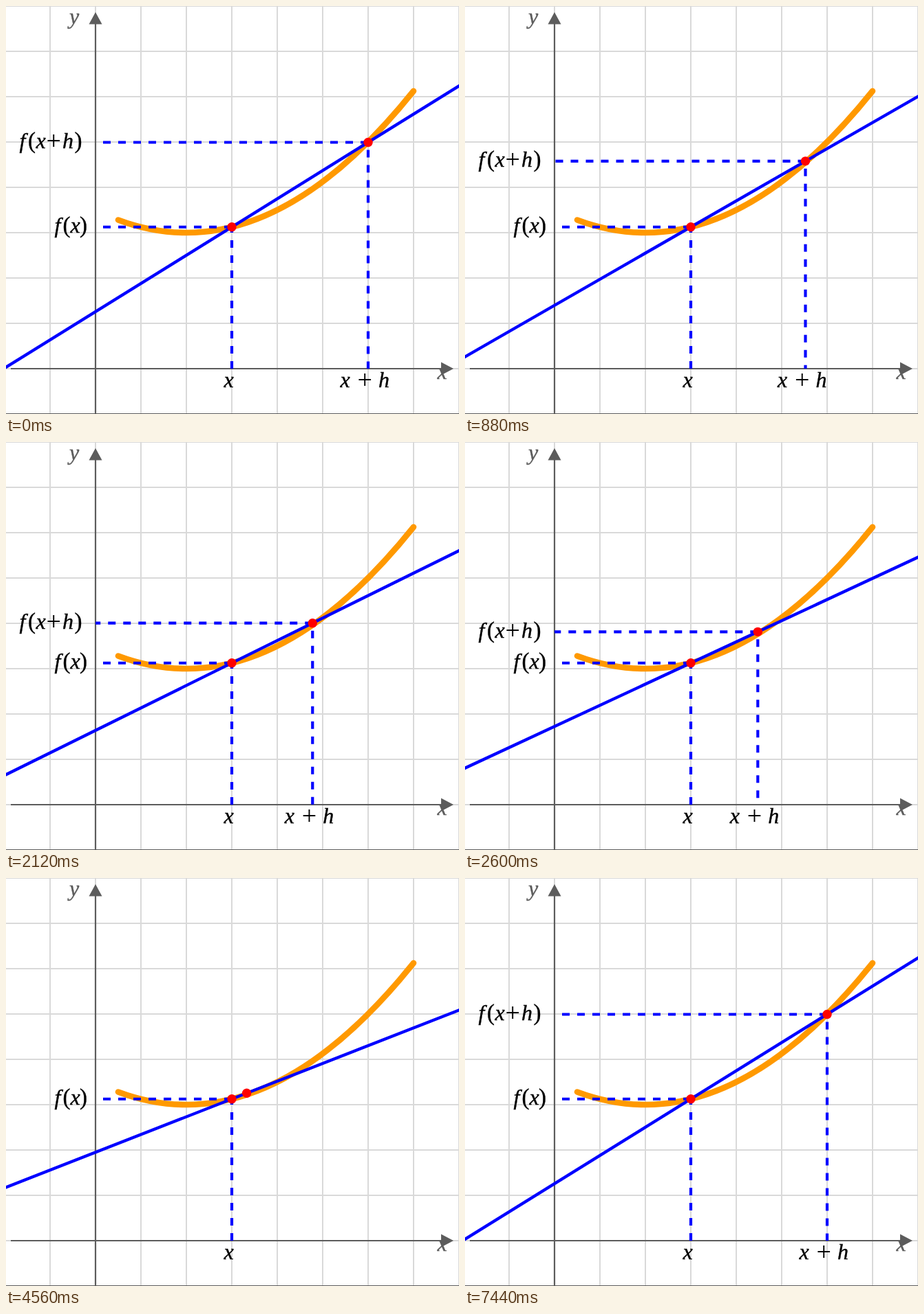
Recreate the animation shown at these times as an HTML page. Size 658 by 594 pixels, loop 7.48 s.

```html
<!DOCTYPE html>
<html lang="en">
<head>
<meta charset="utf-8">
<title>Secant to tangent</title>
<style>
  html, body { margin: 0; width: 100%; height: 100%; overflow: hidden; background: #fff; }
  svg { display: block; width: 658px; height: 594px; }
  text { font: italic 32px "Liberation Serif", "Times New Roman", serif; stroke: #000; stroke-width: .4px; }
  .paren { font-style: normal; font-size: 33px; }
  .plus { font-style: normal; font-size: 38px; stroke-width: 0; }
  .axis text { fill: #5c5c5c; stroke: #5c5c5c; }
  .dash { fill: none; stroke: #00f; stroke-width: 4.2; stroke-dasharray: 11 11; }
  .line { stroke: #00f; stroke-width: 4.4; }
  .dot { fill: #f00; }
</style>
</head>
<body>
<svg id="stage" viewBox="0 0 658 594">
  <defs>
    <clipPath id="quadrant"><rect x="130" y="0" width="528" height="528"/></clipPath>
  </defs>
  <path id="grid" stroke="#d9d9d9" stroke-width="2"/>
  <g class="axis">
    <path d="M130 594V20M7 528H640" stroke="#5c5c5c" stroke-width="2.2"/>
    <path d="M130 9l9.5 17.5h-19zM650 528l-18 9.5v-19z" fill="#5c5c5c"/>
    <path d="M0 593.5H658" stroke="#5c5c5c"/>
  </g>
  <path d="M163 311.44Q377.5 391.88 592 123.75" fill="none" stroke="#f90" stroke-width="8.6" stroke-linecap="round"/>
</svg>
<script>
const LOOP = 7480, STEP = 40, UNIT = 66;
const BASE = { x: 328, y: 321.75 };
const AXIS_Y = 528, REACH = 330;
const stage = document.getElementById('stage');

// Knots of [time, value]: horizontal gap between the points, slope of the line.
const GAP = [[0, 198], [880, 166.5], [1600, 139], [2600, 97.3], [3800, 52], [5320, 3], [5560, 2.5]];
const SLOPE = [[0, .6225], [880, .576], [1600, .527], [2600, .4666], [3040, .438],
               [3800, .427], [4560, .392], [5320, .2145]];

const clamp01 = v => Math.min(1, Math.max(0, v));

// Monotone cubic interpolation through the knots.
function curve(knots) {
  const last = knots.length - 1;
  const rate = i => (knots[i + 1][1] - knots[i][1]) / (knots[i + 1][0] - knots[i][0]);
  const tangent = knots.map((_, i) => {
    if (i === 0) return rate(0);
    if (i === last) return 0;
    const a = rate(i - 1), b = rate(i);
    return a * b > 0 ? 2 * a * b / (a + b) : 0;
  });
  return t => {
    if (t >= knots[last][0]) return knots[last][1];
    let i = 0;
    while (t >= knots[i + 1][0]) i++;
    const [t0, v0] = knots[i], [t1, v1] = knots[i + 1];
    const d = t1 - t0, u = (t - t0) / d, w = 1 - u;
    return v0 * (1 + 2 * u) * w * w + v1 * u * u * (3 - 2 * u)
         + d * u * w * (tangent[i] * w - tangent[i + 1] * u);
  };
}
const gapAt = curve(GAP), slopeAt = curve(SLOPE);

function add(parent, tag, attrs = {}) {
  const el = document.createElementNS('http://www.w3.org/2000/svg', tag);
  set(el, attrs);
  parent.appendChild(el);
  return el;
}

function set(el, attrs) {
  for (const key in attrs) el.setAttribute(key, attrs[key]);
}

// Sets each sign of a formula at its own x.
function formula(parent, signs, xs, y) {
  const text = add(parent, 'text');
  [...signs].forEach((sign, i) => {
    const plus = sign === '+';
    const kind = plus ? 'plus' : '()'.includes(sign) ? 'paren' : 'letter';
    add(text, 'tspan', { class: kind, x: xs[i], y: plus ? y + 2 : y }).textContent = sign;
  });
  return text;
}

// The line, the moving point and the guides that follow it.
function makePose() {
  const root = add(stage, 'g');
  const guides = add(root, 'g');
  const clip = add(guides, 'g', { 'clip-path': 'url(#quadrant)' });
  const across = add(clip, 'path', { class: 'dash' });
  const down = add(clip, 'path', { class: 'dash' });
  const xLabel = formula(guides, 'x+h', [-40.5, -15.5, 15], 554.5);
  const yLabel = formula(guides, 'f(x+h)', [19.5, 32, 43.5, 58.5, 82, 99.5], 8.5);
  const line = add(root, 'line', { class: 'line', x1: -10, x2: 668 });
  const dot = add(root, 'circle', { class: 'dot', r: 6.7 });

  return (t, opacity) => {
    const gap = gapAt(t), slope = slopeAt(t);
    const x = BASE.x + gap, y = BASE.y - slope * gap;
    const lineY = at => BASE.y - slope * (at - BASE.x);
    set(root, { opacity });
    set(guides, { opacity: 1 - clamp01((t - 2760) / 280) });
    set(across, { d: `M${x} ${y}H0` });
    set(down, { d: `M${x} ${y + REACH}V${y}` });
    set(xLabel, { transform: `translate(${x})` });
    set(yLabel, { transform: `translate(0 ${y})` });
    set(line, { y1: lineY(-10), y2: lineY(668) });
    set(dot, { cx: x, cy: y });
  };
}

let grid = '';
for (let x = 64; x <= 658; x += UNIT) grid += `M${x} 0V594`;
for (let y = 0; y <= 594; y += UNIT) grid += `M0 ${y}H658`;
set(document.getElementById('grid'), { d: grid });

const axis = stage.querySelector('.axis');
formula(axis, 'y', [92], 26);
formula(axis, 'x', [626.5], 542.5);

add(stage, 'path', { class: 'dash', d: `M${BASE.x} ${AXIS_Y}V${BASE.y}` });
add(stage, 'path', { class: 'dash', d: `M${BASE.x} ${BASE.y}H130` });
formula(stage, 'x', [316.5], 554.5);
formula(stage, 'f(x)', [70.5, 82.5, 93.5, 107], 329.5);

const drawMoving = makePose(), drawStart = makePose();
add(stage, 'circle', { class: 'dot', r: 6.7, cx: BASE.x, cy: BASE.y });

const origin = performance.now();
function frame() {
  const t = Math.floor(Math.max(0, performance.now() - origin) % LOOP / STEP) * STEP;
  const mix = clamp01((t - 7040) / 400);
  drawMoving(t, 1 - mix);
  drawStart(0, mix);
  requestAnimationFrame(frame);
}
frame();
</script>
</body>
</html>
```
